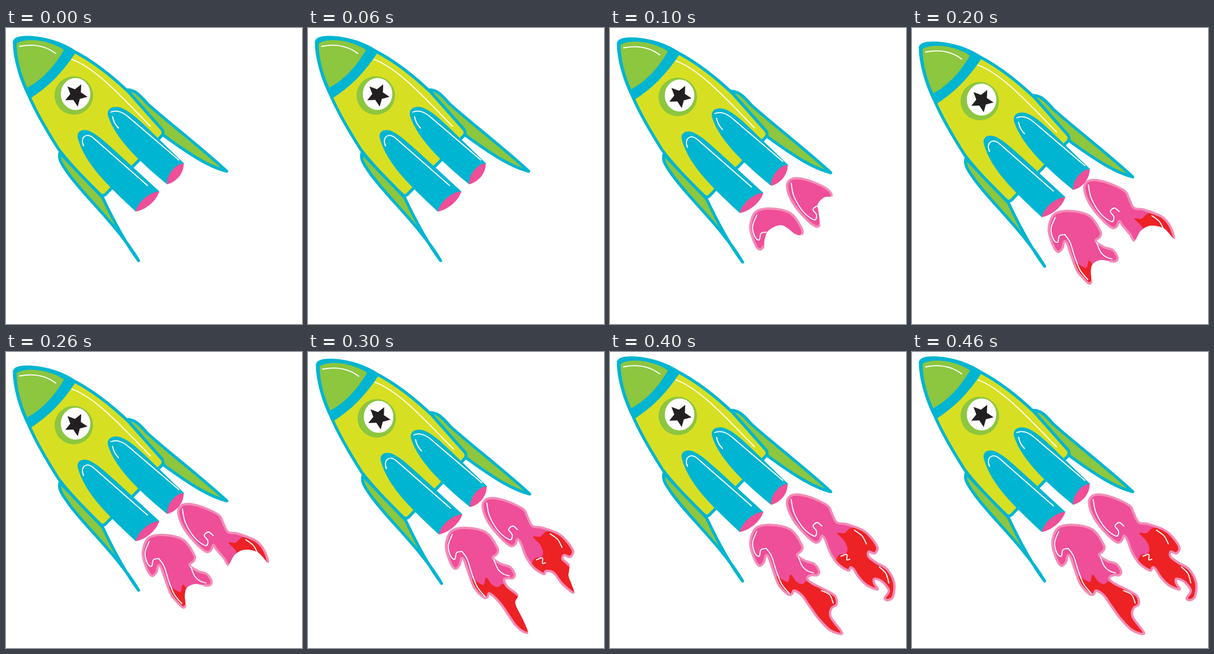
These frames come from a looping animation (500x500 px, 500 ms). An HTML page:

```html
<!DOCTYPE html>
<html lang="en">
<head>
<meta charset="utf-8">
<title>Rocket</title>
<style>
  html, body { margin: 0; width: 100%; height: 100%; overflow: hidden; background: #fff; }
  svg { display: block; width: 100%; height: 100%; }
  .line { fill: none; stroke: #fff; stroke-width: 1.8; stroke-linecap: round; }
  .hull { stroke: #00b5d1; stroke-width: 5; stroke-linejoin: round; }
  .cyan { fill: #00b5d1; }
  .lime { fill: #d7df23; }
  .green { fill: #8dc63f; }
  .pink { fill: #ef4e98; }
  .red { fill: #ed2224; }
  .edge { fill: none; stroke: #f48cb8; stroke-width: 4; stroke-linejoin: round; }
</style>
</head>
<body>
<svg viewBox="0 0 500 500">
  <g id="flames"></g>
  <g id="rocket">
    <path class="green hull" d="M200 105C216 102 226 113 238 127C272 158 330 202 373 242C345 235 315 217 267 182Z"/>
    <path class="green hull" d="M91 211C89 220 91 226 104 244C130 282 190 335 224 393C203 365 180 322 163 286Z"/>
    <path class="lime hull" d="M14 23C16 16 32 15 43 16C70 18 96 27 116 40C150 58 185 87 208 109L264 172Q267 178 263 182L222 226L171 278Q164 287 158 280C130 252 108 230 89 205C70 175 52 145 39 115C24 85 14 50 14 23Z"/>
    <path class="cyan" d="M14 23Q20 15 43 16Q84 19 118 41C96 75 71 100 41 119C24 88 14 52 14 23Z"/>
    <path class="green" d="M18 26C35 16 72 20 98 37C82 64 63 86 36 101C25 77 18 50 18 26Z"/>
    <path class="cyan" d="M172 147C170 134 184 131 195 135C208 140 221 152 235 165L301 229L272 264C238 236 184 190 172 147Z"/>
    <path class="cyan" d="M121 185C119 173 132 169 143 175C160 184 171 196 185 208L259 276L219 310C180 273 133 232 121 185Z"/>
    <path class="pink" d="M300 229C287 229 271 247 272 264C287 261 301 245 300 229Z"/>
    <path class="pink" d="M259 276C243 277 223 293 219 310C234 308 254 293 259 276Z"/>
    <circle class="green" cx="114.5" cy="114" r="32.5"/>
    <ellipse cx="117.5" cy="111.5" rx="25" ry="27" fill="#fff"/>
    <polygon id="star" fill="#231f20"/>
    <path class="line" d="M23 31Q59 24 84 43M111 53C151 67 196 117 244 166"/>
    <path class="line" d="M177 142C189 137 200 144 210 153L292 223M180 150Q182 161 190 169"/>
    <path class="line" d="M131 199C124 184 137 175 149 187L239 266"/>
  </g>
</svg>
<script>
const STEP = 100;
const rocketShift = [[0, 0], [0, 2.5], [0, 9.5], [1.7, -2], [0, -6]];

// Each flame keeps its shape while it moves; only its tail grows.
// shine: [points, first pose in which it shows]
const left = {
  shift: [[0, 0], [0, 13], [-6, 17], [-4, 5], [0, 0]],
  side: "311,403 307,409 300,409 285,393 276,370 268,347 263,344",
  head: "260,355 252,361 243,347 237,322 246,298 270,292 305,300 324,326 323,336",
  mid: "316,343 330,353 345,358 353,370 350,377 340,377",
  red: "280,380 292,385 301,388 305,376 315,388 325,392 333,387 350,390 410,400 410,490 300,420",
  shine: [
    ["248,303 241,322 245,340 252,345 255,334 264,332", 1],
    ["264,332 273,345 281,370 290,392 303,408", 2],
    ["318,346 325,362 334,370 344,373", 2],
    ["357,403 371,410 377,424", 4]
  ]
};
const right = {
  shift: [[0, 0], [0, 13], [-8, 16], [-4, 6], [0, 0]],
  side: "411,366 406,364 402,369 385,358 372,339 364,318 358,310",
  head: "354,319 345,321 325,303 307,279 299,255 305,243 320,241 345,248 368,260 374,271",
  mid: "383,288 400,291 430,303 451,328 447,340 437,337",
  red: "384,306 396,306 408,297 430,300 460,320 500,380 490,430 440,410 380,380 385,345 398,341 401,331 395,318",
  shine: [
    ["306,249 311,272 327,298 345,311 349,303 343,294 350,288 358,294", 1],
    ["413,301 426,311 433,324", 2],
    ["390,345 400,342 400,351 405,350", 3],
    ["455,363 466,374 471,390", 4]
  ]
};

// from, to: used part of side and mid; bite: bare stretch that closes the contour
left.tails = [
  null,
  { from: 7, to: 0, bite: "313,335 290,320 268,329 261,345" },
  { start: "309,411 304,414 293,403", from: 3, to: 6, bite: "324,375 311,382 308,395" },
  { start: "375,469 356,458 330,421", from: 0, to: 6, end: "335,380 341,392 358,406", bite: "354,420 367,447" },
  { from: 0, to: 6, end: "333,382 340,390 362,401 380,412 383,426 374,433 373,448 392,475 372,470 352,450 336,428 324,411" }
];
right.tails = [
  null,
  { from: 7, to: 0, bite: "362,273 351,284 352,296" },
  { start: "384,343 376,332", from: 5, to: 3, end: "444,319 450,339", bite: "433,322 410,318 394,327" },
  { start: "453,401 434,386 419,367", from: 1, to: 6, end: "434,344 445,355", bite: "444,372 449,386" },
  { from: 0, to: 6, end: "437,346 450,356 468,367 480,390 478,413 470,419 464,416 471,403 460,388 447,383 446,390 452,401 434,394 420,380" }
];

const byId = id => document.getElementById(id);
const parse = (text = "") => text.split(" ").filter(Boolean).map(p => p.split(",").map(Number));

// Smooth path through the points, drawn for the given number of segments
function curve(points, closed, count = points.length - !closed) {
  const n = points.length;
  const at = i => points[closed ? (i + n) % n : Math.max(0, Math.min(n - 1, i))];
  const bend = (p, a, b) => p.map((v, k) => v + (b[k] - a[k]) / 6);
  let d = "M" + at(0);
  for (let i = 0; i < count; i++) {
    const p = at(i), q = at(i + 1);
    d += `C${bend(p, at(i - 1), q)} ${bend(q, at(i + 2), p)} ${q}`;
  }
  return d;
}

const path = (name, d, more = "") => `<path class="${name}" d="${d}" ${more}/>`;

function drawFlame(flame, name, pose) {
  const tail = flame.tails[pose];
  if (!tail) return "";
  const rim = [
    ...parse(tail.start), ...parse(flame.side).slice(tail.from), ...parse(flame.head),
    ...parse(flame.mid).slice(0, tail.to), ...parse(tail.end)
  ];
  const all = rim.concat(parse(tail.bite));
  const body = curve(all, true), id = name + pose;
  const shine = flame.shine.filter(s => pose >= s[1]).map(s => path("line", curve(parse(s[0]))));
  return `<g transform="translate(${flame.shift[pose]})">
    <clipPath id="${id}"><path d="${body}"/></clipPath>
    ${path("pink", body)}
    ${pose > 1 ? path("red", curve(parse(flame.red), true), `clip-path="url(#${id})"`) : ""}
    ${path("edge", curve(all, true, tail.bite ? rim.length - 1 : all.length))}
    ${shine.join("")}</g>`;
}

byId("flames").innerHTML = rocketShift.map((_, pose) =>
  `<g>${drawFlame(left, "left", pose)}${drawFlame(right, "right", pose)}</g>`).join("");

byId("star").setAttribute("points", Array.from({ length: 10 }, (_, i) => {
  const angle = (81 + i * 36) * Math.PI / 180, r = i % 2 ? 9.5 : 20;
  return [118 + r * Math.cos(angle), 113 + r * Math.sin(angle)];
}).join(" "));

function render(time) {
  const pose = Math.floor(time / STEP) % rocketShift.length;
  byId("rocket").setAttribute("transform", `translate(${rocketShift[pose]})`);
  [...byId("flames").children].forEach((g, i) => g.style.display = i === pose ? "" : "none");
}

let start;
function tick(now) {
  start ??= now;
  render(now - start);
  requestAnimationFrame(tick);
}
render(0);
requestAnimationFrame(tick);
</script>
</body>
</html>
```
